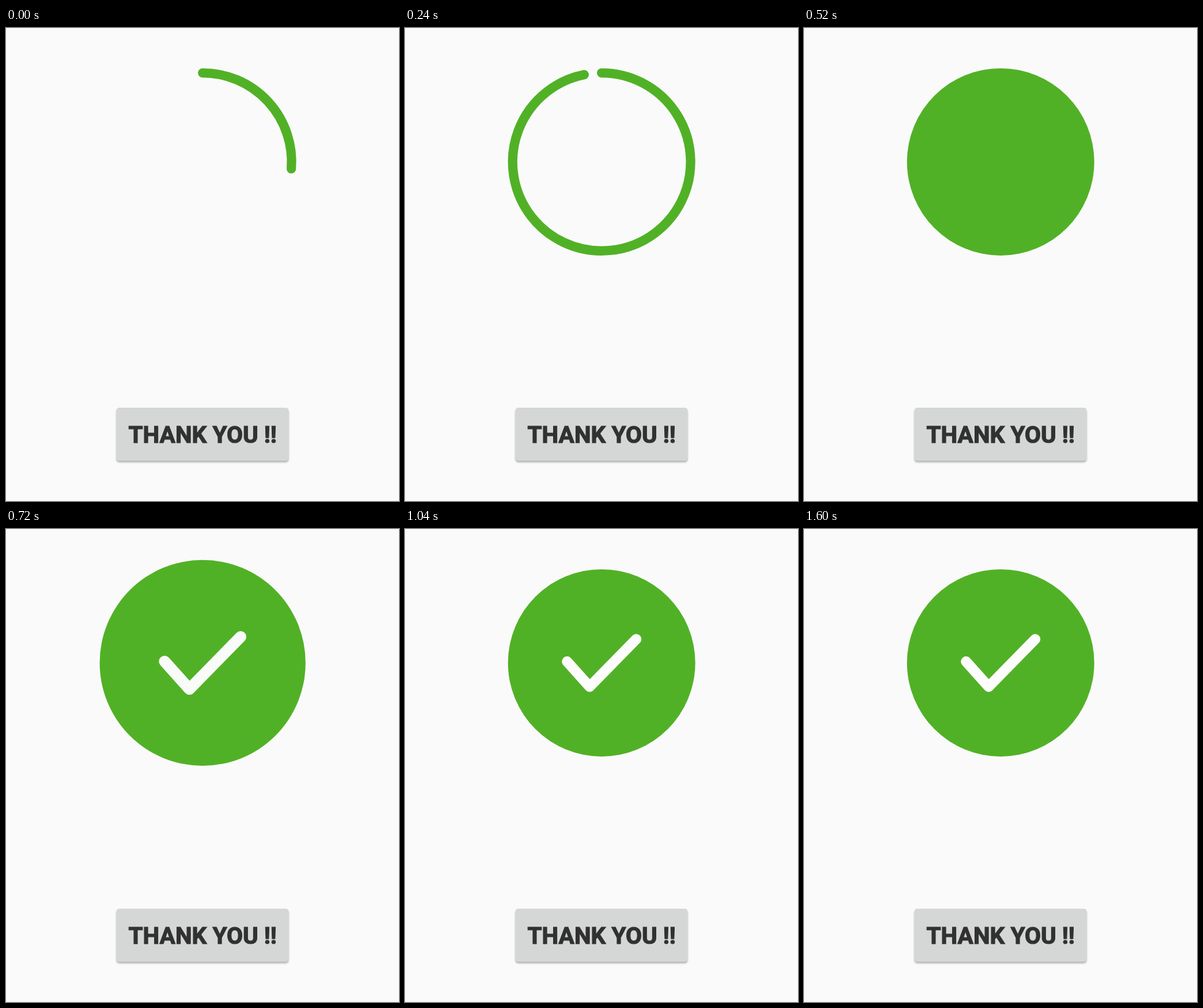
An HTML page that plays this animation: 682 px wide and 821 px high, repeating every 1720 ms.

```html
<!DOCTYPE html>
<html lang="en">
<head>
<meta charset="utf-8">
<title>Thank you</title>
<style>
  html, body { margin: 0; width: 100%; height: 100%; overflow: hidden; background: #fafafa; }
  svg { display: block; width: 100%; height: 100%; }
  .btn { fill: #d5d7d7; filter: drop-shadow(0 3px 1.6px rgba(0, 0, 0, .27)); }
  text {
    font: 700 40.6px Roboto, sans-serif; text-anchor: middle;
    fill: #313131; stroke: #313131; stroke-width: 1.2px;
  }
</style>
</head>
<body>
<svg viewBox="0 0 682 821">
  <g id="badge">
    <path id="arc" fill="none" stroke="#51b126" stroke-width="16.2" stroke-linecap="round"/>
    <circle id="disc" r="162.5" fill="#51b126"/>
    <circle id="hole" fill="#fafafa"/>
    <path id="check" d="M-60 -2.3L-20.8 41.3L60 -41.2" fill="none" stroke="#fdfdfd"
      stroke-width="18" stroke-linecap="round" stroke-linejoin="round"/>
  </g>
  <rect class="btn" x="191.5" y="659" width="299" height="92" rx="5"/>
  <text x="341.2" y="720">THANK YOU !!</text>
</svg>
<script>
const LOOP = 1720, STEP = 40, LAST = 1600;
const RING = { start: -151, length: 441 };
const FILL = { start: 259, length: 260 };
const POP = { start: 540, length: 470 };
const FADE = { start: 540, length: 200 };
const R = 154.4, HOLE = 146.4, PEAK = 0.155;

const [badge, arc, disc, hole, check] =
  ['badge', 'arc', 'disc', 'hole', 'check'].map(id => document.getElementById(id));

const part = (t, { start, length }) => Math.min(1, Math.max(0, (t - start) / length));
const smooth = x => (1 - Math.cos(Math.PI * x)) / 2;
const decelerate = x => 1 - (1 - x) ** 2;
const show = (el, on) => el.setAttribute('visibility', on ? 'visible' : 'hidden');

function draw(t) {
  const filling = t >= FILL.start;
  show(arc, !filling);
  show(disc, filling);
  show(hole, filling);

  const a = 2 * Math.PI * Math.min(0.9999, smooth(part(t, RING)));
  const large = a > Math.PI ? 1 : 0;
  arc.setAttribute('d', `M0 ${-R}A${R} ${R} 0 ${large} 1 ${R * Math.sin(a)} ${-R * Math.cos(a)}`);
  hole.setAttribute('r', HOLE * (1 - decelerate(part(t, FILL))));

  // grows, then returns to rest
  const pop = 1 - Math.abs(1 - 2 * smooth(part(t, POP)));
  badge.setAttribute('transform', `translate(341.2 232.4) scale(${1 + PEAK * pop})`);
  check.setAttribute('opacity', smooth(part(t, FADE)));
}

const origin = performance.now();
function loop() {
  const t = (performance.now() - origin) % LOOP;
  draw(Math.min(LAST, Math.floor(t / STEP) * STEP));
  requestAnimationFrame(loop);
}
loop();
</script>
</body>
</html>
```
